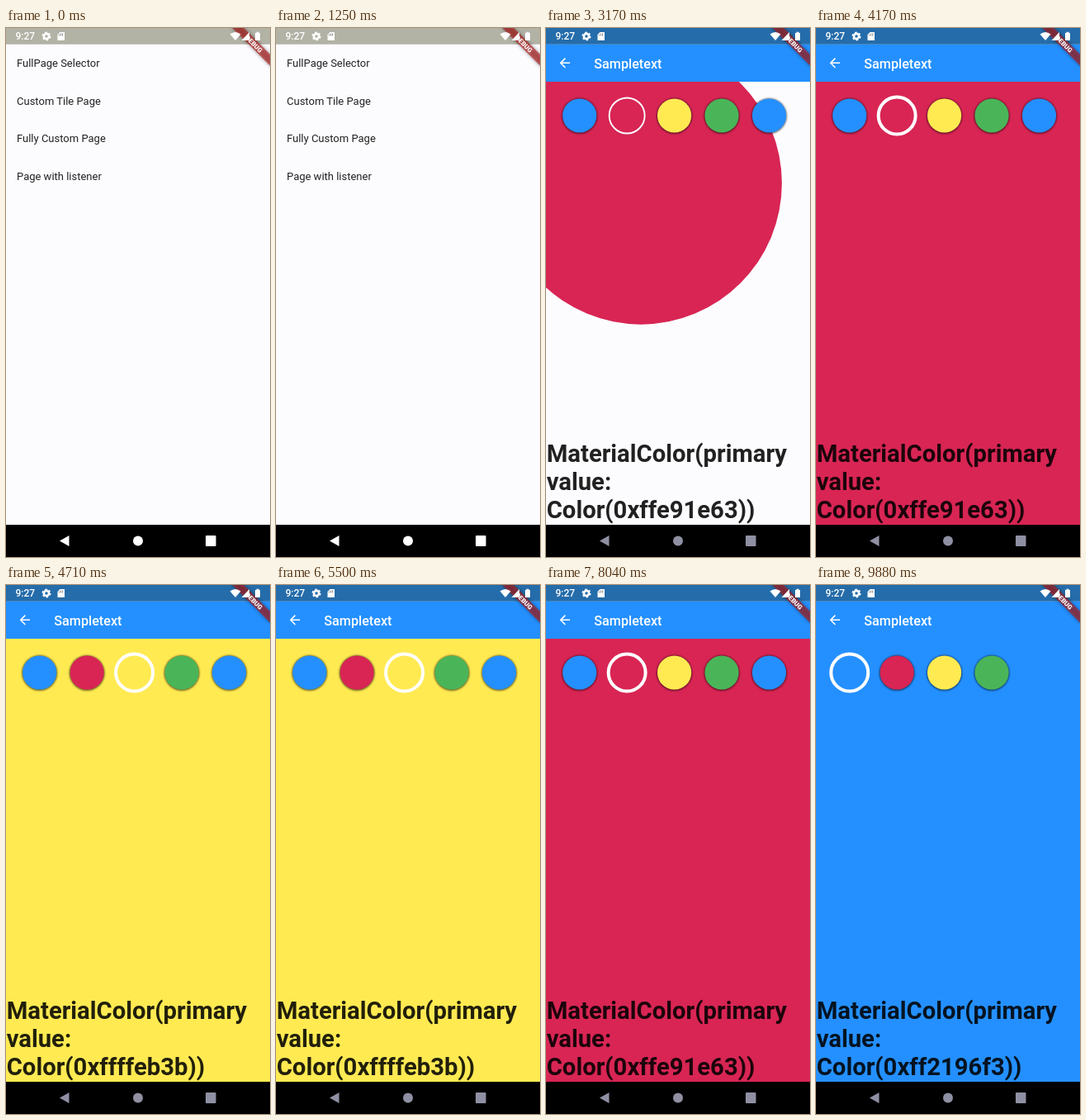
An HTML page for the animation above (9.92 s loop, 320 by 640 pixels).

```html
<!DOCTYPE html>
<html lang="en">
<head>
<meta charset="utf-8">
<title>Color selector</title>
<style>
  html, body { margin: 0; width: 100%; height: 100%; overflow: hidden; background: #fcfcff; }
  svg { display: block; width: 320px; height: 640px; font-family: Roboto, sans-serif; }
  .list { font-size: 13px; fill: #222; }
  .title { font-size: 16.2px; font-weight: 500; fill: #fff; }
  .label { font-size: 29.25px; font-weight: 700; fill: rgba(0, 0, 0, .87); }
  .shadow { fill: rgba(0, 0, 0, .6); filter: blur(1px); }
  .glow { fill: rgba(0, 0, 0, .4); filter: blur(2px); }
</style>
</head>
<body>
<svg viewBox="0 0 320 640">
  <clipPath id="body"><rect y="65" width="320" height="536"/></clipPath>
  <rect width="320" height="640" fill="#fcfcff"/>
  <rect width="320" height="19.5" fill="#b2b2a5"/>
  <g class="list">
    <text x="13" y="47">FullPage Selector</text>
    <text x="13" y="92.5">Custom Tile Page</text>
    <text x="13" y="138">Fully Custom Page</text>
    <text x="13" y="184">Page with listener</text>
  </g>

  <g id="page">
    <rect y="19.5" width="320" height="582" fill="#fcfcff"/>
    <g clip-path="url(#body)"><circle id="wave"/></g>
    <rect width="320" height="65" fill="#2490ff"/>
    <path fill="#fff" transform="translate(13.5 33) scale(.778)"
      d="M20 11H7.83l5.59-5.59L12 4l-8 8 8 8 1.41-1.41L7.83 13H20z"/>
    <text class="title" x="58.3" y="48.5">Sampletext</text>
    <g id="buttons"></g>
    <g class="label" id="label">
      <text x=".7" y="525">MaterialColor(primary</text>
      <text x=".7" y="559">value:</text>
      <text x=".7" y="593" id="value"></text>
    </g>
  </g>

  <rect width="320" height="19.5" fill="#b2b2a5"/>
  <rect id="strip" width="320" fill="#256caa"/>

  <g transform="translate(320) rotate(45)">
    <rect class="glow" x="-34" y="22.4" width="68" height="9.8"/>
    <rect x="-34" y="22.4" width="68" height="9.8" fill="#b71c1c" fill-opacity=".63"/>
    <text y="30.2" font-size="7.9" font-weight="900" fill="#fff" text-anchor="middle">DEBUG</text>
  </g>

  <g fill="#fff">
    <text x="11.5" y="14" font-size="12" font-weight="500">9:27</text>
    <circle cx="49" cy="10" r="3.1" fill="none" stroke="#fff" stroke-width="2.6"/>
    <circle cx="49" cy="10" r="4.8" fill="none" stroke="#fff" stroke-width="1.4" stroke-dasharray="2.5 2.53"/>
    <path d="M65.5 5h5.5v10h-8.5v-7z"/>
    <path d="M64.5 7.5v2M66.5 6.5v3M68.5 6.5v3" stroke="#888"/>
    <path d="M271.5 7.5q6.5-5 13 0l-6.5 7.5z"/>
    <path d="M295 5v10h-9.5z"/>
    <path d="M302 6h1.5v-1.2h3v1.2h1.5v9h-6z"/>
  </g>

  <rect y="601" width="320" height="39" fill="#000"/>
  <g id="nav">
    <path d="M65 620.5l11.5-6.5v13z"/>
    <circle cx="160" cy="620.5" r="6"/>
    <rect x="242" y="614" width="12.5" height="13" rx="1"/>
  </g>
</svg>
<script>
const LOOP = 9920, OPEN = 2070, WAVE = 490, RING = 280;
const colors = [
  { fill: '#2490ff', code: '2196f3' },
  { fill: '#d82554', code: 'e91e63' },
  { fill: '#ffea52', code: 'ffeb3b' },
  { fill: '#4ab558', code: '4caf50' },
  { fill: '#2490ff', code: '2196f3' }
];
const taps = [[3037, 1], [4290, 2], [6433, 0], [7460, 1], [8470, 0]];

const $ = id => document.getElementById(id);
const clamp = v => Math.min(1, Math.max(0, v));
const mix = (a, b, p) => a + (b - a) * p;
const buttonX = i => 40.7 + 57.45 * i;

function set(el, attrs) {
  for (const key in attrs) el.setAttribute(key, attrs[key]);
  return el;
}
function add(parent, tag, attrs) {
  return parent.appendChild(set(document.createElementNS('http://www.w3.org/2000/svg', tag), attrs));
}

// Cubic bezier easing, solved by bisection
function ease(x1, y1, x2, y2) {
  const at = (a, b, u) => 3 * a * u * (1 - u) ** 2 + 3 * b * u * u * (1 - u) + u ** 3;
  return x => {
    let lo = 0, hi = 1;
    for (let i = 0; i < 20; i++) {
      const mid = (lo + hi) / 2;
      if (at(x1, x2, mid) < x) lo = mid; else hi = mid;
    }
    return at(y1, y2, hi);
  };
}
const slideEase = ease(.4, 0, .2, 1), fadeEase = ease(.42, 0, 1, 1);

const buttons = colors.map((color, i) => {
  const group = add($('buttons'), 'g', { transform: `translate(${buttonX(i)} 106)` });
  return {
    group,
    shadow: add(group, 'circle', { class: 'shadow', cy: .4, r: 21.4 }),
    disc: add(group, 'circle', { fill: color.fill, stroke: '#fff' })
  };
});

function drawButtons(t, tap, previous) {
  const grow = tap ? clamp((t - tap[0]) / RING) : 0;
  buttons.forEach(({ group, shadow, disc }, i) => {
    let s = 0;
    if (tap && tap[1] === i) s = grow;
    else if (previous && previous[1] === i) s = 1 - grow;
    const width = 4 * s;
    set(disc, { r: mix(20.6, 24.5, s) - width / 2, 'stroke-width': width });
    set(shadow, { opacity: 1 - s });
    // The last button merges into its own color
    set(group, { opacity: i === 4 && tap && tap[1] === 0 ? 0 : 1 });
  });
}

function draw(t) {
  const open = clamp((t - OPEN) / 300);
  const shift = 150 * (1 - slideEase(open));
  const alpha = open === 1 ? 1 : open && fadeEase(open);
  set($('page'), { transform: `translate(0 ${shift})`, opacity: alpha });
  set($('strip'), { height: Math.max(0, 19.5 - shift), opacity: alpha });
  const gray = clamp((t - OPEN) / 120);
  set($('nav'), { fill: `rgb(${mix(255, 144, gray)},${mix(255, 144, gray)},${mix(255, 164, gray)})` });

  const n = taps.filter(([start]) => start <= t).length;
  const tap = taps[n - 1], previous = taps[n - 2];
  drawButtons(t, tap, previous);
  set($('label'), { opacity: tap ? 1 : 0 });
  if (!tap) {
    set($('wave'), { r: 0 });
    return;
  }
  const [start, i] = tap;
  const p = clamp((t - start) / WAVE);
  set($('wave'), {
    cx: mix(buttonX(i), 160, p),
    cy: mix(106, 405, p),
    r: mix(21, 569, p),
    fill: colors[i].fill
  });
  $('value').textContent = `Color(0xff${colors[i].code}))`;
}

const begin = performance.now();
function frame() {
  draw((performance.now() - begin) % LOOP);
  requestAnimationFrame(frame);
}
frame();
</script>
</body>
</html>
```
